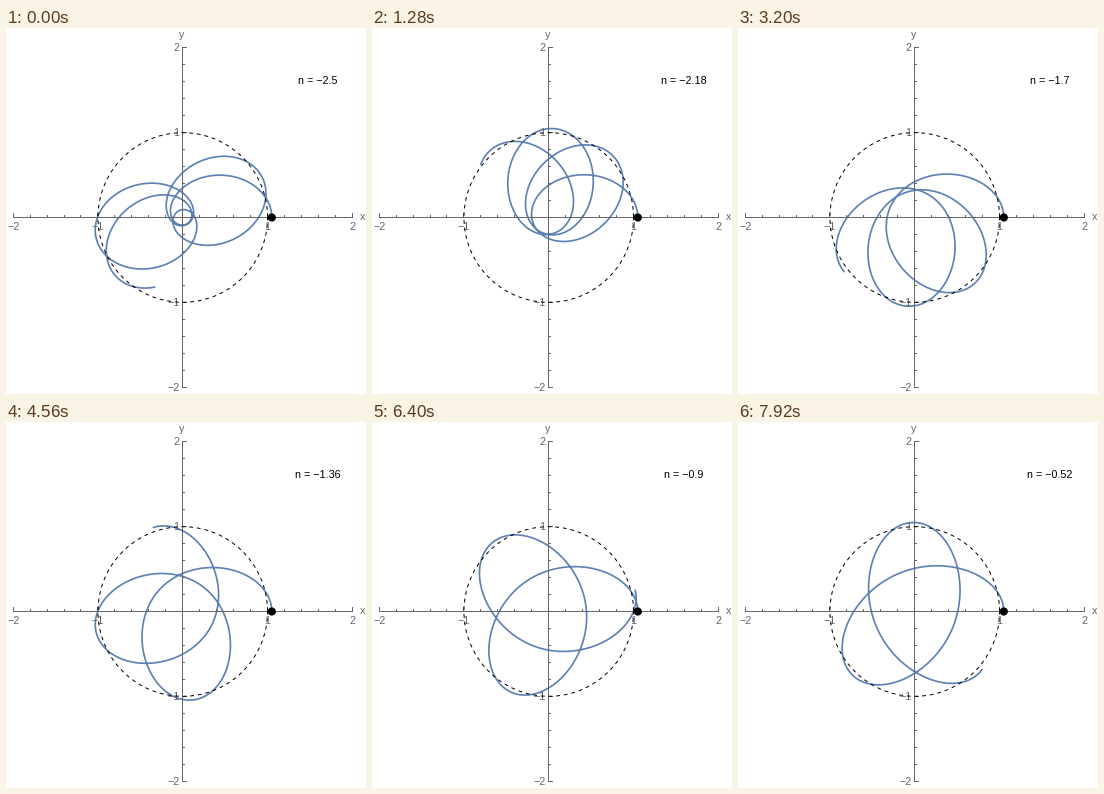
Write a matplotlib script that moves like this. It is 360x366 px and loops after 8 s.

```python
import numpy as np
import matplotlib.pyplot as plt
from matplotlib.animation import FuncAnimation
from matplotlib.patches import Circle

WIDTH, HEIGHT = 360, 366
CX, CY, UNIT = 176.75, 189.5, 84.8
FRAMES, INTERVAL = 100, 80
START, SPEED, DURATION, STEPS = 1.05, 0.6, 10, 8000
GRAY = "0.4"
BLUE = (0.368, 0.507, 0.710)

plt.rcParams["font.family"] = "Liberation Sans"
plt.rcParams["font.size"] = 10.7

exponents = -2.5 + 0.02 * np.arange(FRAMES)


def derivative(state):
    """Motion under a central attraction of strength r**n."""
    pos, vel = state
    r = np.hypot(pos[0], pos[1])
    return np.array([vel, -pos * r ** (exponents - 1)])


def solve_orbits():
    """Integrate the orbits for all exponents together with RK4."""
    dt = DURATION / STEPS
    state = np.zeros((2, 2, FRAMES))
    state[0, 0] = START
    state[1, 1] = SPEED
    path = [state[0]]
    for _ in range(STEPS):
        k1 = derivative(state)
        k2 = derivative(state + dt / 2 * k1)
        k3 = derivative(state + dt / 2 * k2)
        k4 = derivative(state + dt * k3)
        state = state + dt / 6 * (k1 + 2 * k2 + 2 * k3 + k4)
        path.append(state[0])
    return np.array(path)[::4]


def to_stage(x, y):
    return CX + UNIT * x, CY - UNIT * y


def pixel(value):
    """Centre of the pixel that holds a stage coordinate."""
    return np.floor(value) + 0.5


def number(value):
    return str(value).replace("-", "\u2212")


fig = plt.figure(figsize=(WIDTH / 72, HEIGHT / 72), dpi=72, facecolor="white")
ax = fig.add_axes([0, 0, 1, 1])
ax.set_xlim(0, WIDTH)
ax.set_ylim(HEIGHT, 0)
ax.axis("off")


def axis_line(xs, ys):
    # Pixel centres are chosen here, so the renderer must not snap again
    ax.plot(xs, ys, color=GRAY, lw=1, solid_capstyle="projecting",
            snap=False, zorder=3)


def label(x, y, text, align="center"):
    ax.text(x, y, text, color=GRAY, ha=align, va="baseline", zorder=3)


axis_x, axis_y = pixel(CX), pixel(CY)
left, bottom = map(pixel, to_stage(-2, -2))
right, top = map(pixel, to_stage(2, 2))
axis_line([left, right], [axis_y, axis_y])
axis_line([axis_x, axis_x], [bottom, top])
for i in range(-10, 11):
    if i == 0:
        continue
    major = i % 5 == 0
    size = 4 if major else 2
    x, y = map(pixel, to_stage(i / 5, i / 5))
    axis_line([x, x], [axis_y, axis_y - size])
    axis_line([axis_x, axis_x + size], [y, y])
    if major:
        label(x, 202, number(i // 5))
        label(173.5, y + 3.5, number(i // 5), "right")
label(356.5, 192.5, "x")
label(175.5, 9.5, "y")

turn = np.linspace(0, 2 * np.pi, 400)
ax.plot(*to_stage(np.cos(turn), np.sin(turn)), color="black", lw=1,
        ls=(0, (3.84, 3.84)), dash_capstyle="butt", zorder=4)
ax.add_patch(Circle(to_stage(START, 0), 4.1, color="black", lw=0, zorder=5))

orbits = solve_orbits()
curve, = ax.plot([], [], color=BLUE, lw=1.7, zorder=2)
caption = ax.text(311.5, 56, "", color="black", ha="center", va="baseline")


def update(frame):
    curve.set_data(*to_stage(orbits[:, 0, frame], orbits[:, 1, frame]))
    # Whole values keep a trailing point, as in "2."
    value = f"{exponents[frame]:.2f}".rstrip("0")
    caption.set_text("n = " + number(value))
    return curve, caption


anim = FuncAnimation(fig, update, frames=FRAMES, interval=INTERVAL,
                     repeat=True, repeat_delay=0)
plt.show()
```
